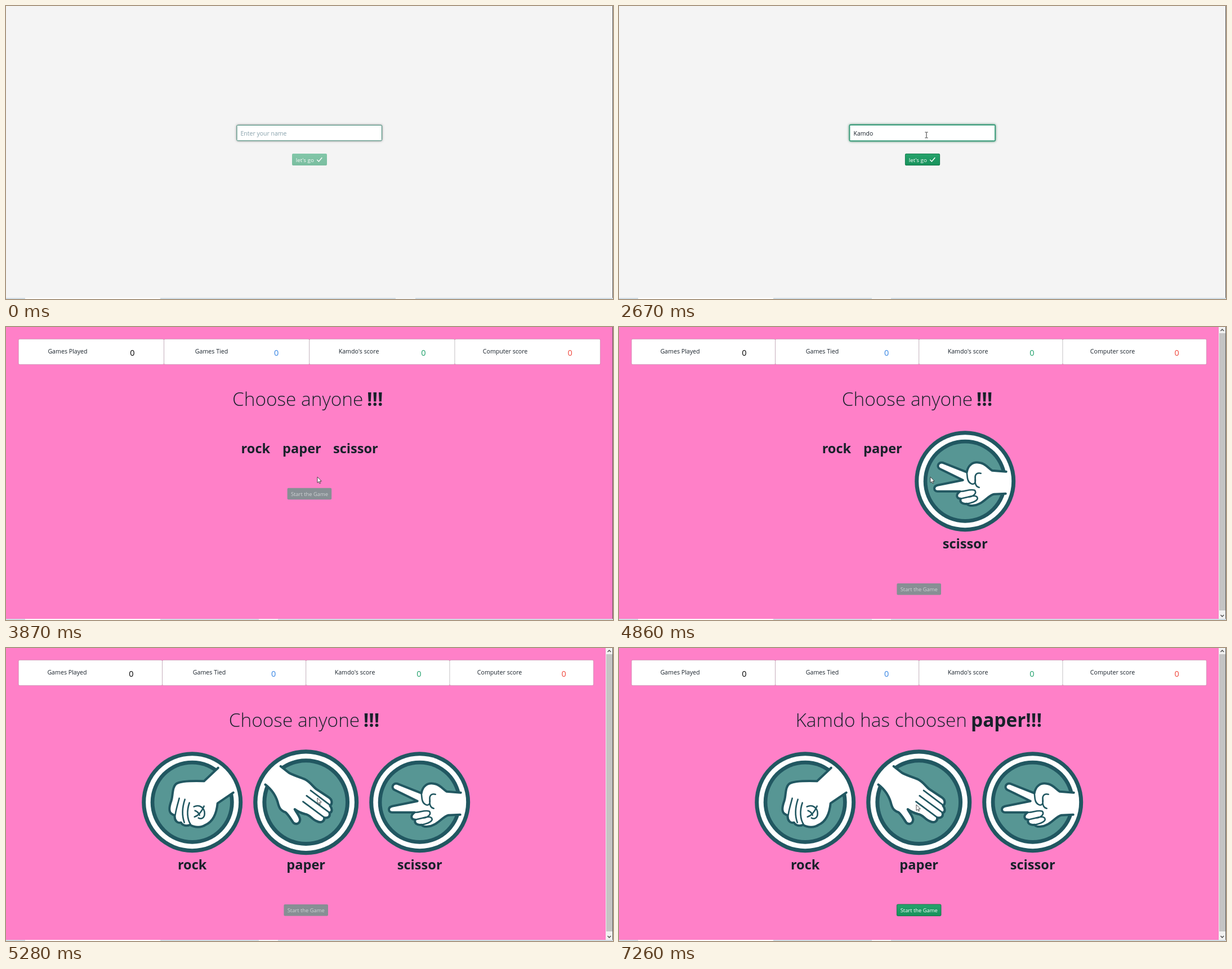
An HTML page for the animation above (8000 ms loop, 1078x520 px).

```html
<!DOCTYPE html>
<html lang="en">
<head>
<meta charset="utf-8">
<title>Rock paper scissor</title>
<style>
html, body { margin: 0; width: 100%; height: 100%; overflow: hidden; background: #f4f4f4; }
svg { display: block; width: 100vw; height: 100vh; font-family: "Open Sans", "Noto Sans", sans-serif; fill: #18212a; }
.mid { text-anchor: middle; }
.end { text-anchor: end; }
.bold { font-weight: 700; }
.label { font-size: 10.65px; }
.num { font-size: 14.5px; }
.title { font-size: 33.4px; }
.thin { font-weight: 300; }
.item { font-size: 23.6px; font-weight: 700; text-anchor: middle; }
.line { fill: none; stroke: #215761; stroke-width: 4; stroke-linecap: round; stroke-linejoin: round; }
.fine { stroke-width: 2.6; }
</style>
</head>
<body>
<svg id="stage" viewBox="0 0 1078 520" xmlns="http://www.w3.org/2000/svg"></svg>
<script>
const LOOP = 8000;
const NAME = "Kamdo";
const typedAt = [1460, 2050, 2320, 2520, 2640];

const clamp = v => Math.max(0, Math.min(1, v));
const ramp = (t, a, b) => clamp((t - a) / (b - a));
const ease = x => x * x * (3 - 2 * x);
const fade = (t, a, b) => ease(ramp(t, a, b));

const rect = (x, y, w, h, fill, more = "") =>
  `<rect x="${x}" y="${y}" width="${w}" height="${h}" fill="${fill}" ${more}/>`;
const text = (x, y, str, cls, more = "") =>
  `<text x="${x}" y="${y}" class="${cls}" ${more}>${str}</text>`;

// Each hand: open outline, tail that joins it to the white ring, inner lines.
const hands = {
  rock: {
    edge: "M46-61L21-37.5C5-38-20-38-28-33C-36-27-34-12-37-3C-41 8-42 18-36 21Q-32 24-31 23C-32 33-26 38-20 36C-17 42-9 43-4 40C5 46 17 45 24 40C35 35 43 22 45 2L73-17",
    tail: "L77-20A79.5 79.5 0 0 0 51-61Z",
    lines: "M-23-7C-26 4-29 14-30 22M-13-5C-18 10-18 25-14 36M-5 1C-10 15-9 30-3 39M3 8C13 3 22 10 22 20C22 27 17 31 11 28M21 7C17 16 11 24 4 26M5 15Q11 17 13 23"
  },
  paper: {
    edge: "M-43-61L-29-50C-20-45-8-42-2-39C8-34 12-26 18-22L39-8C45-4 45 3 41 6C45 11 45 17 40 18C42 24 37 28 31 26C32 33 25 36 18 32C11 30 7 21-2 20C-10 18-15 15-19 12C-16 18-11 23-10 29C-10 37-18 39-22 34C-26 28-30 21-35 17C-44 14-46 8-48 0C-51-10-56-20-69-30",
    tail: "L-73-32A79.5 79.5 0 0 1-47-64Z",
    lines: "M8-20L41 5M1-11L39 17M-5-1L30 25"
  },
  scissor: {
    edge: "M73-17L48-19C41-23 36-32 25-33C13-35 5-28 3-16L-40-33C-48-35-51-25-45-22L-4-2L-49 7C-57 9-56 18-49 18L-9 18C-16 23-17 30-8 31C-10 38-4 41 3 40C7 45 18 44 25 40C35 36 42 25 51 23L72 22",
    tail: "L76 22A79.5 79.5 0 0 0 77-17Z",
    lines: "M28-14C19-16 17-10 18-4C19 3 16 7 10 4C3 0 4-9 3-16M18-6C17 3 19 10 25 11M-9 18C0 19 8 13 17 16C22 22 13 28 5 28L-8 31M5 28C12 26 22 24 22 31C20 36 10 39 3 40"
  }
};

function badge(kind) {
  const h = hands[kind];
  const rings = [[89.5, "#215761"], [82.5, "#fdfefe"], [74, "#215761"], [67.3, "#579694"]]
    .map(([r, c]) => `<circle r="${r}" fill="${c}"/>`).join("");
  return `<g id="${kind}Img">${rings}<path d="${h.edge + h.tail}" fill="#fff"/>
    <path d="${h.edge}" class="line"/><path d="${h.lines}" class="line fine"/></g>`;
}

const kinds = ["rock", "paper", "scissor"];
const wordWidth = { rock: 51, paper: 68, scissor: 78 };

const cards = [
  ["Games Played", "#000", 87.2, 202.2],
  ["Games Tied", "#3584e4", 84.5, 199.5],
  [NAME + "'s score", "#1a9e67", 87.7, 202.7],
  ["Computer score", "#f0453a", 89.5, 204.5]
];

const login = `<g id="login">
  ${rect(0, 0, 1078, 518, "#f4f4f4")}
  ${rect(410, 211.5, 257.5, 27.5, "#fff", 'rx="1.5" stroke="#36836f" style="filter:drop-shadow(0 0 2px rgba(0,0,0,.4))"')}
  ${rect(409.5, 211, 258.5, 28.5, "#fff", 'id="focus" rx="1.5" stroke="#379c7a" stroke-width="1.8" style="filter:drop-shadow(0 0 2px rgba(25,135,84,.55))"')}
  ${text(416.5, 230.3, "Enter your name", "", 'id="hint" font-size="10.5" fill="#86a0aa"')}
  ${text(416.5, 230.3, "", "", 'id="typed" font-size="10.5"')}
  ${rect(506.8, 260.8, 64, 23, "#fff", 'id="ring" rx="3" stroke="#1b66d6" stroke-width="2"')}
  <g id="go">
    ${rect(508, 262, 62, 21, "url(#green)", 'rx="2"')}
    ${rect(508.4, 262.4, 61.2, 20.2, "none", 'id="goEdge" rx="2" stroke="#157347" stroke-width=".8"')}
    ${rect(508, 262, 62, 21, "#0f6940", 'id="goDark" rx="2"')}
    ${text(514.7, 276.7, "let's go", "", 'font-size="9.85" fill="#fff"')}
    <path d="M552.3 272.7L555.4 275.9L561.3 269" fill="none" stroke="#fff" stroke-width="1.5"/>
  </g></g>`;

const game = `<g id="game">
  ${rect(0, 0, 1078, 518, "#ff80c8")}
  ${cards.map(([label, color], i) => `
    ${rect(0, 21.5, 0, 45, "#fff", `id="card${i}" rx="2" stroke="#000" stroke-opacity=".2" stroke-width=".8"`)}
    ${text(0, 47.3, label, "label mid", `id="label${i}"`)}
    ${text(0, 51, "0", "num mid", `id="num${i}" style="fill:${color}"`)}`).join("")}
  ${text(0, 140, "", "title thin end", 'id="lead"')}
  ${text(0, 140, "", "title bold", 'id="tail"')}
  ${kinds.map(k => badge(k) + text(0, 0, k, "item", `id="${k}Word"`)).join("")}
  <g id="start">
    ${rect(-39.3, -10.3, 78.6, 20.6, "#878f94", 'rx="2"')}
    <g id="startOn">${rect(-39.3, -10.3, 78.6, 20.6, "url(#green)", 'rx="2" stroke="#146c43" stroke-width=".8"')}</g>
    ${text(0, 4, "Start the Game", "mid", 'id="startText" font-size="9.4" style="fill:#fff"')}
  </g>
  <g id="scroll">
    ${rect(1065, 0, 12.5, 518, "#f1f1f1")}
    ${rect(1066, 11, 11, 492, "#c4c4c4")}
    <path d="M1068.5 7L1071.3 4L1074.1 7M1068.5 511L1071.3 514L1074.1 511" fill="none" stroke="#505050" stroke-width="1.5"/>
  </g></g>`;

const stage = document.getElementById("stage");
stage.innerHTML = `<defs>
    <linearGradient id="green" x2="0" y2="1">
      <stop offset="0" stop-color="#26a36c"/><stop offset="1" stop-color="#17915b"/>
    </linearGradient>
    <clipPath id="loading">${rect(-95, -95, 190, 128.5, "#000")}</clipPath>
  </defs>${login}${game}
  ${rect(1077, 0, 1, 518, "#5a5a5a")}
  ${rect(0, 518, 1078, 2, "#d0dce5")}
  ${rect(34, 518, 240, 2, "#fff")}
  ${rect(692, 518, 35, 2, "#f3f6f8", 'id="tabA"')}
  ${rect(449, 518, 34, 2, "#f3f6f8", 'id="tabB"')}
  <path id="arrow" d="M0 0V10.4L2.4 8.3L4 11.8L5.5 11.1L4 7.7H7.3Z" fill="#fff" stroke="#222" stroke-width=".8"/>
  <path id="beam" d="M-2.6-5H-.7L0-4.4L.7-5H2.6M0-4.4V4.4M-2.6 5H-.7L0 4.4L.7 5H2.6" fill="none" stroke="#333" stroke-width="1"/>`;

const ui = {};
stage.querySelectorAll("[id]").forEach(e => ui[e.id] = e);
const set = (id, attrs) => { for (const k in attrs) ui[id].setAttribute(k, attrs[k]); };
const show = (id, on) => { ui[id].style.display = on ? "" : "none"; };
const alpha = (id, v) => { ui[id].style.opacity = v; };

// time, x, y
const route = [
  [250, 711, 520], [520, 546, 222], [720, 546, 222], [1190, 546, 229],
  [3190, 546, 229], [3400, 554, 268], [3660, 554, 268], [3730, 553, 266],
  [5810, 553, 266], [5880, 549, 267], [6140, 549, 267], [6370, 536, 247], [6700, 528, 278]
];

function pointer(t) {
  let i = 0;
  while (i < route.length - 2 && t > route[i + 1][0]) i++;
  const [a, b] = [route[i], route[i + 1]];
  const p = fade(t, a[0], b[0]);
  return [a[1] + (b[1] - a[1]) * p, a[2] + (b[2] - a[2]) * p];
}

function drawLogin(t) {
  const count = typedAt.filter(s => t >= s).length;
  alpha("focus", t < 3660 ? fade(t, 720, 900) : 0);
  show("hint", count === 0);
  ui.typed.textContent = NAME.slice(0, count);
  const on = fade(t, 1440, 1580);
  alpha("go", 0.55 + 0.45 * on);
  alpha("goEdge", on);
  alpha("goDark", fade(t, 3240, 3400));
  alpha("ring", ramp(t, 3650, 3780));
}

function drawGame(t) {
  const wide = t < 4860;
  const mid = wide ? 538.9 : 532.7;
  const cardW = wide ? 258.25 : 255.25;
  const shift = wide ? 0 : 1;
  show("scroll", !wide);

  cards.forEach(([, , labelX, numX], i) => {
    const x = 22.3 + cardW * i;
    set("card" + i, { x, width: cardW });
    set("label" + i, { x: x + labelX - shift });
    set("num" + i, { x: x + numX - 2 * shift });
  });

  const chosen = t >= 6970;
  ui.lead.textContent = chosen ? NAME + " has choosen" : "Choose anyone";
  ui.tail.textContent = chosen ? "paper!!!" : "!!!";
  set("lead", { x: chosen ? 618 : mid + 95.5 });
  set("tail", { x: chosen ? 625 : mid + 102 });

  const loaded = { rock: t >= 5140, paper: t >= 5000, scissor: t >= 4860 };
  const zoom = {
    rock: 1,
    paper: 1 + 0.045 * fade(t, 5140, 5280),
    scissor: 1 + 0.02 * fade(t, 4860, 4990) * (1 - fade(t, 5000, 5080))
  };
  const gap = 22.5;
  const widths = kinds.map(k => loaded[k] ? 179.5 : wordWidth[k]);
  let x = mid - (widths[0] + widths[1] + widths[2] + 2 * gap) / 2;
  kinds.forEach((k, i) => {
    const cx = x + widths[i] / 2;
    show(k + "Img", loaded[k]);
    set(k + "Img", { transform: `translate(${cx} 273.7) scale(${zoom[k]})` });
    set(k + "Word", { x: cx, y: loaded[k] ? 392.6 : 223.6 });
    x += widths[i] + gap;
  });
  set("paperImg", { "clip-path": t < 5070 ? "url(#loading)" : "none" });

  const on = fade(t, 6970, 7200);
  set("start", { transform: `translate(${mid} ${wide ? 296 : 465.2})` });
  alpha("startOn", on);
  alpha("startText", 0.6 + 0.4 * on);
}

function draw(t) {
  const inGame = t >= 3870;
  show("login", !inGame);
  show("game", inGame);
  if (inGame) drawGame(t); else drawLogin(t);

  const tab = fade(t, 720, 1000);
  alpha("tabA", 1 - tab);
  alpha("tabB", tab);

  const [x, y] = pointer(t);
  const overField = !inGame && x > 410 && x < 668 && y > 211 && y < 239;
  show("beam", t >= 250 && overField);
  show("arrow", t >= 250 && !overField);
  set(overField ? "beam" : "arrow", { transform: `translate(${x} ${y})` });
}

function tick() {
  draw(performance.now() % LOOP);
  requestAnimationFrame(tick);
}
tick();
</script>
</body>
</html>
```
